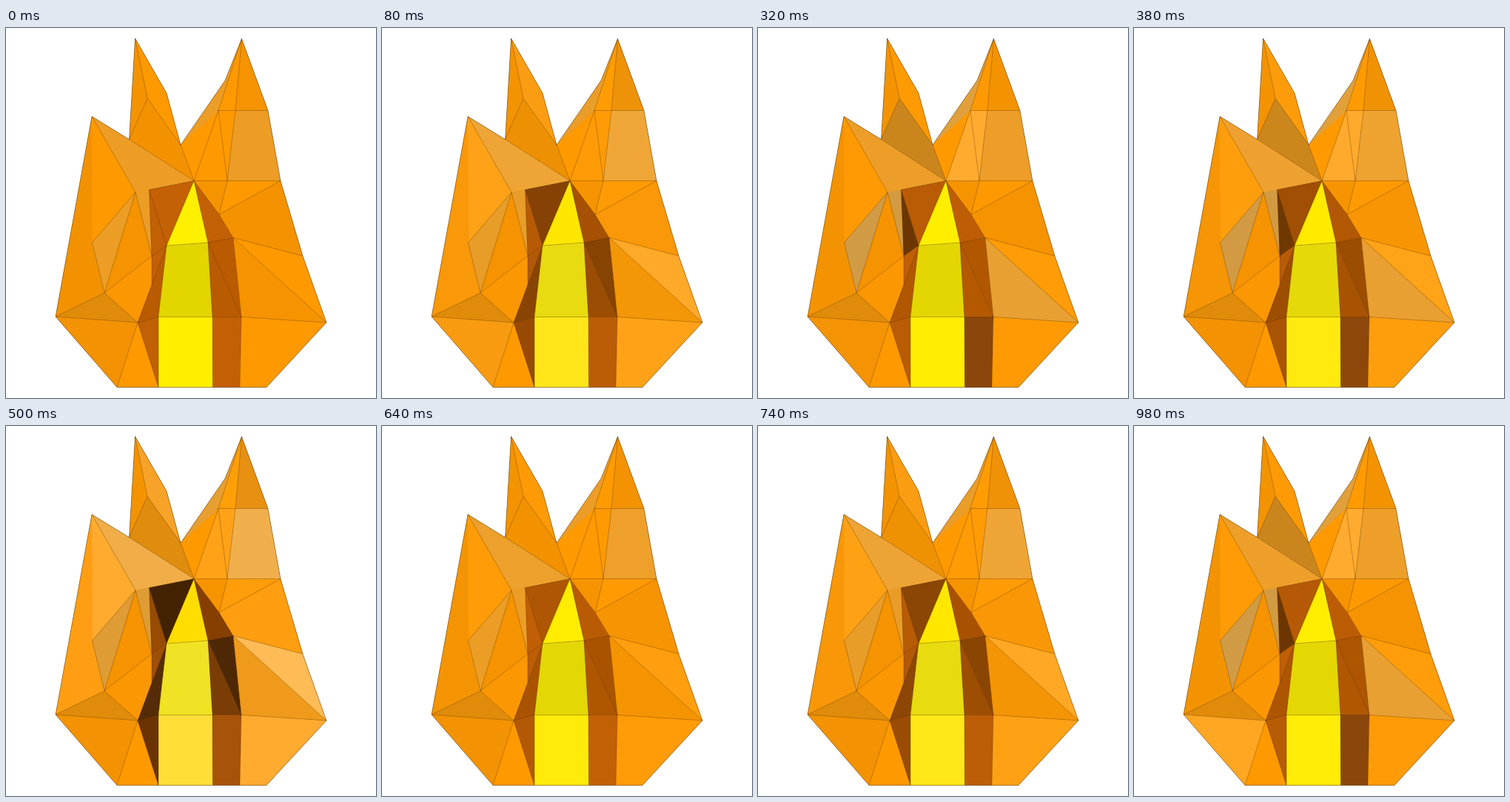
An HTML page for the animation above (1000 ms loop, 500x500 px).

```html
<!DOCTYPE html>
<html lang="en">
<head>
<meta charset="utf-8">
<title>Faceted flame</title>
<style>
html, body { margin: 0; width: 100%; height: 100%; overflow: hidden; background: #fff; }
svg { display: block; width: 100%; height: 100%; }
#base { fill: #f49200; }
#creases, #rim { fill: none; stroke: #000; stroke-width: .5; stroke-linejoin: round; }
#creases { stroke-opacity: .45; }
#rim { stroke-opacity: .7; }
</style>
</head>
<body>
<svg viewBox="0 0 500 500">
  <polygon id="base"/>
  <g id="facets"></g>
  <path id="creases"/>
  <polygon id="rim"/>
</svg>
<script>
const points = {
  A: '174.5,14', B: '166.5,150.5', C: '191,95', D: '217,88', E: '236,158',
  F: '116,119.5', G: '254,206.5', H: '175,222', I: '116.5,290', J: '133,358',
  K: '67,390', L: '178,398', M: '150,485.5', N: '206,485.5', O: '193.5,218.5',
  P: '217,294', Q: '197,308', R: '197,347', S: '206,390.5', T: '273,290',
  U: '307,283.5', V: '279,390.5', W: '318,390.5', X: '279.5,485.5', Y: '316,485.5',
  Z: '352,485.5', a: '433,398', b: '401,308', c: '371,206.5', d: '354,111.5',
  e: '318.5,14.5', f: '296,71', g: '287,111.5', h: '310,111.5', i: '299,206.5',
  j: '288,252'
};
const outline = 'FBADEfedcbaZMK';
const creases = `ACE BC BGE FHJIH GO HQ JQP LJKL LM NLR LS RQOPR GPTU PS GTV SVW
  SN VX WY TWU GjU ij jc Gic iggG ge ghd ehi bUa Wa`.split(/\s+/);

// corners, resting colour, lit colour, pulse
const facets = `
ABC f49300
ACED ff9900 f7a228 fast
BCEG f39200 ca861d slow
FBGOH ed9d26 f0ad48 fast
FIH ff9900 ffab30 fast
FKJI f39200 ff9e12 fast
HIJ ec9d25 d19b45 slow
HOQ ec9d25 d29b42 slow
HJQ f59300
JQRL fb9703
KJL e08b0a
KLM f39202 ffa623 late
LMN ff9900
LSN c16005 6b3303 fast
LRPS b95b00 562c08 fast
OPQ c26006 6c3601 slow
QPR c26006 a04f06 fast
OGP c46006 432202 fast
GPT ffef00 ffdd00 fast
PTVS e2d500 f0e224 fast
SVXN ffee00 ffde38 fast
GTUj c36006 873f00 fast
TUW ba5b00 4e2805 fast
TWV b95b00 7a3d06 fast
VWYX c36006 8a460b slow
WaZY ff9900 ffab30 fast
UWa f59400 e8a033 slow
Uab ff9900 ffbb55 fast
jcbU f49200 ff9e10 fast
icj ff9900 ff9d0a fast
Gij f69400
Ggi ff9900 ffab2f slow
ghi ff9900 ffab2f slow
EgG ff9900
Efeg ec9d27 e1a03c slow
egh ff9900 ff9f08 fast
ehd f59300 e79012 fast
hdci ed9d25 f1af4b fast`.trim().split('\n').map(row => row.split(' '));

const byId = id => document.getElementById(id);
const corners = names => [...names].map(n => points[n]).join(' ');
const rgb = hex => [0, 2, 4].map(k => parseInt(hex.slice(k, k + 2), 16));

const lit = [];
for (const [names, rest, peak, pulse] of facets) {
  const el = document.createElementNS('http://www.w3.org/2000/svg', 'polygon');
  el.setAttribute('points', corners(names));
  el.setAttribute('fill', '#' + rest);
  byId('facets').append(el);
  if (pulse) lit.push({ el, rest: rgb(rest), peak: rgb(peak), pulse });
}
byId('base').setAttribute('points', corners(outline));
byId('rim').setAttribute('points', corners(outline));
byId('creases').setAttribute('d', creases.map(line => 'M' + corners(line)).join(''));

const third = 1000 / 3;
const wave = t => 1 - Math.abs(1 - 2 * (t % third) / third);
const pulses = {
  fast: wave,
  slow: t => (1 - Math.cos(Math.PI * t / third)) / 2,
  late: t => t < third ? 0.9 * wave(t) : Math.max(0, (t - 740) / 240)
};

// 20 ms ticks with two longer rests
function tick(ms) {
  const t = Math.floor((ms + 1) / 20) * 20 % 1000;
  if (t > 320 && t < 380) return 320;
  if (t > 700 && t < 740) return 700;
  return t;
}

const start = performance.now();
function draw() {
  const t = tick(performance.now() - start);
  for (const { el, rest, peak, pulse } of lit) {
    const k = Math.min(1, pulses[pulse](t));
    const mix = rest.map((v, n) => Math.round(v + (peak[n] - v) * k));
    el.setAttribute('fill', `rgb(${mix})`);
  }
  requestAnimationFrame(draw);
}
draw();
</script>
</body>
</html>
```
